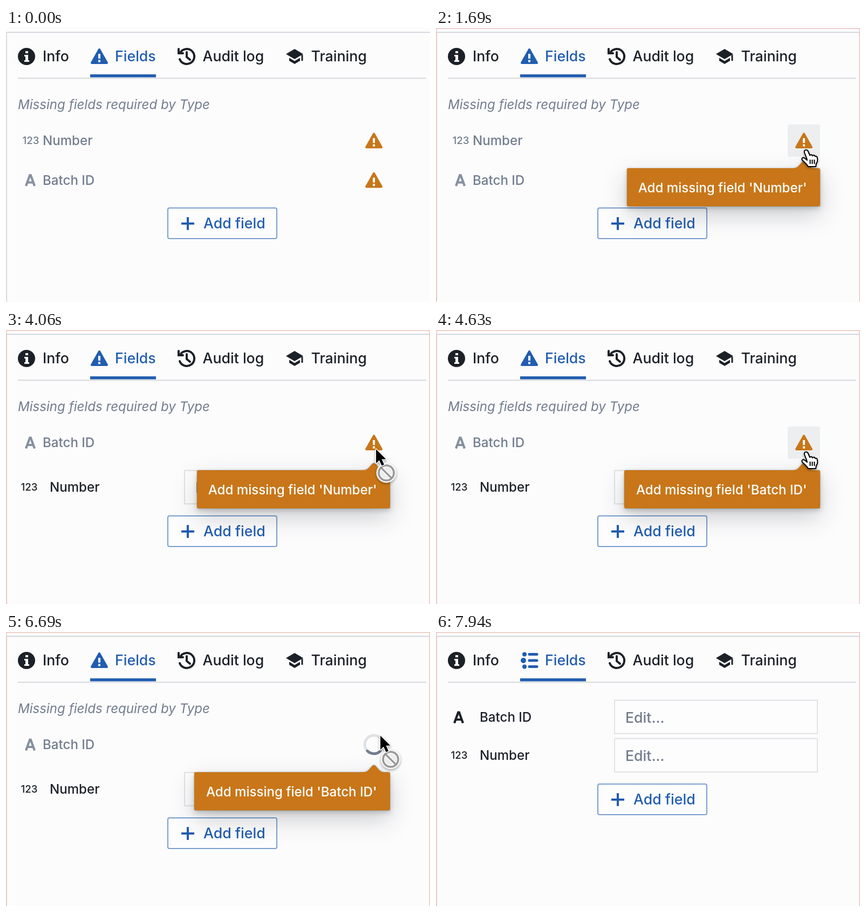
An HTML page for the animation above (8450 ms loop, 786x510 px).

```html
<!DOCTYPE html>
<html lang="en">
<head>
<meta charset="utf-8">
<title>Adding missing fields</title>
<style>
  html, body { margin: 0; width: 100%; height: 100%; overflow: hidden; background: #fcfcfd; }
  svg { display: block; font: 450 24.100px Inter, "Liberation Sans", sans-serif; }
  .big { font-size: 26.700px; }
  .num { font-size: 18.700px; font-weight: 550; }
  .dark { color: #1c2127; }
  .grey { color: #727d8e; }
  .blue { color: #215db0; }
  .dark, .grey, .blue { fill: currentColor; }
  .line { fill: none; stroke: currentColor; }
  .box { fill: #fdfdfd; stroke: #e0e2e5; stroke-width: 2; }
  .tip path {
    fill: #c87619; stroke: #11141822; stroke-width: 2; paint-order: stroke;
    filter: drop-shadow(0 4px 4px #11141833) drop-shadow(0 16px 22px #11141833);
  }
  .tip text { fill: #fff; text-anchor: end; }
  #cursor { filter: drop-shadow(0 2px 2px #0005); }
</style>
</head>
<body>
<svg width="786" height="510" viewBox="0 0 786 510">
  <defs>
    <g id="warning">
      <path d="M0-13 14 12H-14Z" fill="currentColor" stroke="currentColor" stroke-width="4" stroke-linejoin="round"/>
      <path d="M-2-5h4v9h-4zM-2 6.500h4v4h-4z" fill="#fff"/>
    </g>
    <path id="letter" class="line" d="M-8 10.500-.8-9.500H.8L8 10.500M-5 4H5" stroke-width="4.200"/>
  </defs>

  <path d="M0 8H786" stroke="#d3d8dc" stroke-width="2"/>
  <path d="M1 8V510" stroke="#d9dbde" stroke-width="2"/>
  <path id="tint" d="M.5 510V.5H785.500V510" fill="none" stroke="#efc6bb" stroke-width="2"/>
  <path d="M22 93.500H779" stroke="#d6d8db" stroke-width="2"/>
  <path d="M156 89H278" stroke="#215db0" stroke-width="5.500"/>

  <g class="dark big">
    <circle cx="38" cy="53" r="16"/>
    <path d="M36 43h5v4h-5zM34 50h7v10h2v3h-9v-3h2v-7h-2z" fill="#fff"/>
    <text x="68" y="62">Info</text>
    <g class="line" transform="translate(335 53)" stroke-width="4">
      <path d="M-12-7A14 14 0 1 1-13 5M-15-14V-6H-7M0-8V1L6 6" stroke-linecap="round"/>
    </g>
    <text x="364.500" y="62">Audit log</text>
    <path d="M519 48.500 535 39l16 9.500-16 9.500zM525 55.500l10 6 10-6V61l-10 6-10-6zM547.500 50h3v11h-3z"/>
    <text x="565.500" y="62">Training</text>
  </g>
  <g class="blue big">
    <use id="tabWarning" href="#warning" x="173" y="53"/>
    <g id="tabList">
      <path class="line" d="M173 41.500H187M173 53H187M173 64.500H187" stroke-width="5" stroke-linecap="round"/>
      <circle cx="164" cy="41.500" r="4"/><circle cx="162" cy="53" r="5"/><circle cx="164" cy="64.500" r="4"/>
    </g>
    <text x="202" y="62">Fields</text>
  </g>

  <text id="heading" class="grey" x="22" y="151" font-style="italic">Missing fields required by Type</text>

  <rect id="hover" x="652" y="-30" width="60" height="60" rx="3" fill="#8f99a8"/>
  <g id="missingNumber" class="grey" transform="translate(0 210)">
    <text class="num" x="30.500" y="6">123</text><text x="68" y="8">Number</text>
    <use id="numberWarning" href="#warning" x="682" color="#c87619"/>
  </g>
  <g id="missingBatch" class="grey">
    <use href="#letter" x="45" opacity=".85"/><text x="68" y="8">Batch ID</text>
    <use id="batchWarning" href="#warning" x="682" color="#c87619"/>
  </g>
  <g id="spinner" fill="none" stroke-width="5">
    <circle r="17" stroke="#dfe1e4"/>
    <path d="M17 0A17 17 0 0 1 0 17" stroke="#727d8c" stroke-linecap="round"/>
  </g>

  <g id="fieldBatch" class="dark" transform="translate(0 159)">
    <use href="#letter" x="42"/><text x="81" y="8">Batch ID</text>
    <rect class="box" x="331" y="-32" width="376" height="62"/>
    <text class="grey big" x="351" y="10">Edit...</text>
  </g>
  <g id="fieldNumber" class="dark">
    <text class="num" x="27.500" y="6">123</text><text x="81" y="8.500">Number</text>
    <rect class="box" x="331" y="-31" width="376" height="62"/>
    <text class="grey big" x="351" y="10">Edit...</text>
  </g>
  <g id="button" class="blue big">
    <rect x="300" y="-29" width="202" height="57" rx="3" fill="#fdfdfe" stroke="#7a9fd0" stroke-width="2"/>
    <path class="line" d="M325 0H349M337-12V12" stroke-width="4"/>
    <text x="366" y="8.500">Add field</text>
  </g>

  <g id="tipNumber" class="tip">
    <path d="M357 261H662Q668 261 672 257L679 249Q682 246 685 249L692 257Q696 261 702 261H709Q712 261 712 264V329Q712 332 709 332H357Q354 332 354 329V264Q354 261 357 261Z"/>
    <text x="687.500" y="305.500">Add missing field 'Number'</text>
  </g>
  <g id="tipBatch" class="tip">
    <path d="M352 261H662Q668 261 672 257L679 249Q682 246 685 249L692 257Q696 261 702 261H709Q712 261 712 264V329Q712 332 709 332H352Q349 332 349 329V264Q349 261 352 261Z"/>
    <text x="687.500" y="305.500">Add missing field 'Batch ID'</text>
  </g>

  <g id="cursor" stroke-linejoin="round">
    <g id="badge" transform="translate(19 45)">
      <circle r="14.500" fill="#ededed" stroke="#f6f6f6" stroke-width="8"/>
      <path d="M-9-9 9 9" stroke="#fff" stroke-width="7"/>
      <circle r="14" fill="none" stroke="#989898" stroke-width="3.500"/>
      <path d="M-10-10 10 10" stroke="#989898" stroke-width="3.500"/>
    </g>
    <path id="arrow" d="M0 1V27L6 21.500 10.500 31.500 15 29.500 10.500 19.500H18.500Z" stroke="#fff" stroke-width="3" paint-order="stroke"/>
    <g id="hand" stroke="#000" stroke-width="2">
      <path d="M1 21-3 11Q-4 6 0 6 3 6 4 9L7 16Q10 13 12 17 15 14 17 18 21 17 21 22 22 28 19 31L18 37H4Q1 32-7 25-9 21-5 20-2 21 2 25Z" fill="#fff"/>
      <path d="M7.500 24V32M11.500 24V32M15.500 24V32"/>
    </g>
  </g>
</svg>
<script>
const LOOP = 8450;
const NUMBER_ADDED = 3900, BATCH_ADDED = 7560;
const BUSY = [[2440, 4130], [6260, BATCH_ADDED]];
const PRESS = [[2380, 2440], [6200, 6260]];

// Pointer stops: time, x, y
const STOPS = [
  [940, 600, 525], [1130, 671, 310], [1250, 673, 282], [1310, 671, 247], [1480, 686, 221],
  [5190, 686, 221], [5400, 735, 226], [5550, 717, 206], [5690, 694, 192],
  [7560, 694, 192], [7650, 738, 330], [7750, 720, 530]
];

const $ = id => document.getElementById(id);
const show = (id, on) => $(id).style.display = on ? "" : "none";
const place = (id, x, y, more = "") => $(id).setAttribute("transform", `translate(${x} ${y}) ${more}`);
const ramp = (t, start, length) => Math.min(1, Math.max(0, (t - start) / length));
const within = (t, spans) => spans.some(([a, b]) => t >= a && t < b);
const fade = (t, from, to) => Math.min(ramp(t, from, 110), 1 - ramp(t, to, 150));

function pointer(t) {
  const i = STOPS.findIndex(stop => t < stop[0]);
  if (i < 1) return null;
  const [t0, x0, y0] = STOPS[i - 1], [t1, x1, y1] = STOPS[i];
  const u = ramp(t, t0, t1 - t0), k = u * u * (3 - 2 * u);
  return [x0 + (x1 - x0) * k, y0 + (y1 - y0) * k];
}

function tooltip(id, amount, dy = 0) {
  show(id, amount > 0);
  $(id).style.opacity = amount;
  place(id, 682, 246 + dy, `scale(${0.8 + 0.2 * amount}) translate(-682 -246)`);
}

function drawRows(t) {
  const one = t >= NUMBER_ADDED, both = t >= BATCH_ADDED;
  show("tint", t >= 60);
  show("tabWarning", !both);
  show("tabList", both);
  show("heading", !both);
  show("missingNumber", !one);
  show("missingBatch", !both);
  show("fieldNumber", one);
  show("fieldBatch", both);
  place("missingBatch", 0, one ? 210 : 283.5);
  place("fieldNumber", 0, both ? 229.5 : 292.5);
  place("button", 0, both ? 312 : one ? 375 : 364);

  const first = t >= 2440 && !one, second = t >= 6260 && !both;
  show("numberWarning", !first);
  show("batchWarning", !second);
  show("spinner", first || second);
  const angle = first ? 90 + (t - 2810) * 0.72 : 45 + (t - 6690) * 0.72;
  place("spinner", 682, 209.5, `rotate(${angle})`);
}

function drawPointer(t) {
  const at = pointer(t), busy = within(t, BUSY);
  show("cursor", at);
  let row = 0;
  if (at && !busy && t < BATCH_ADDED) {
    const [x, y] = at;
    row = [209.5, 283.5].find(c => Math.abs(x - 682) < 30 && Math.abs(y - c) < 30 && (c < 250 || t < NUMBER_ADDED)) || 0;
  }
  if (at) place("cursor", ...at);
  show("hand", row);
  show("arrow", !row);
  show("badge", busy);
  show("hover", row);
  place("hover", 0, row);
  $("hover").style.opacity = within(t, PRESS) ? 0.3 : 0.15;
}

function frame(now) {
  const t = now % LOOP;
  drawRows(t);
  drawPointer(t);
  tooltip("tipNumber", fade(t, 1500, 4130));
  tooltip("tipBatch",
    Math.max(fade(t, 1150, 1295), fade(t, 4340, 5290), fade(t, 5590, 7720)),
    t < 2000 ? 74 : 0);
  requestAnimationFrame(frame);
}
requestAnimationFrame(frame);
</script>
</body>
</html>
```
